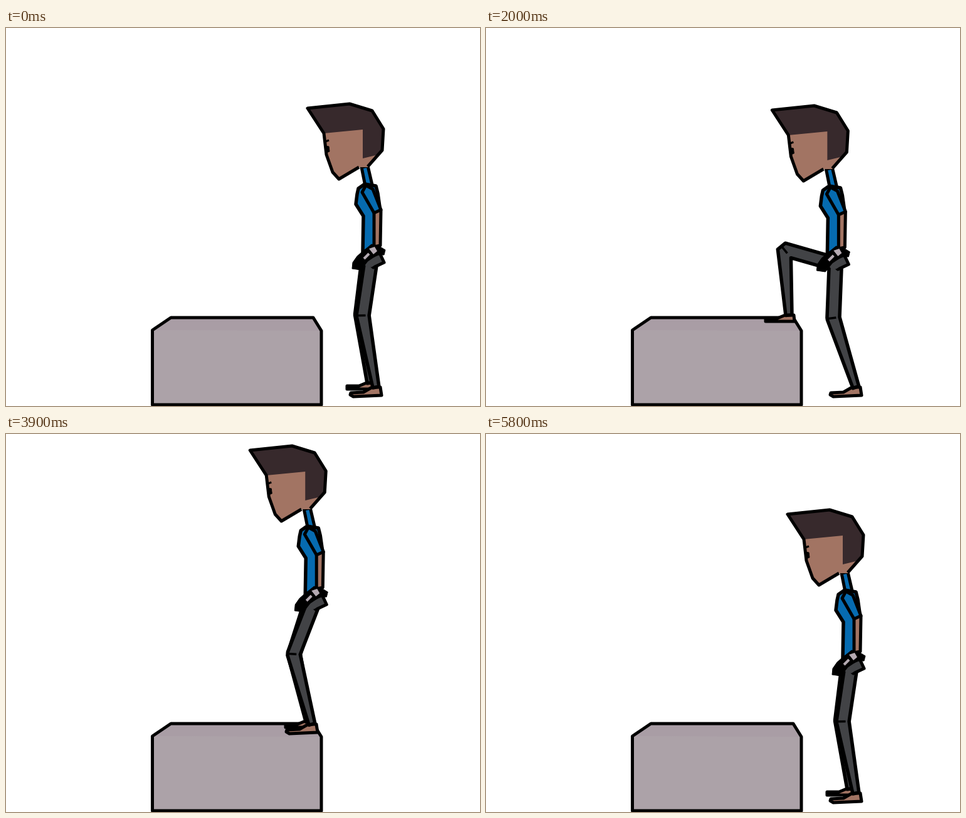
Animation of 756 by 603 pixels, one loop 5.9 s. Source, as an HTML page with a canvas:

```html
<!DOCTYPE html>
<html lang="en">
<head>
<meta charset="utf-8">
<title>Step-ups</title>
<style>
  html, body { margin: 0; width: 100%; height: 100%; overflow: hidden; background: #fff; }
  canvas { display: block; }
</style>
</head>
<body>
<canvas id="stage" width="756" height="603"></canvas>
<script>
const ctx = document.getElementById('stage').getContext('2d');
const LOOP = 5900, STEP = 100, REST = 200, REP = 2800;
const SKIN = '#a27463', HAIR = '#37292c', SHIRT = '#066bb0', PANTS = '#424346',
      BLOCK = '#aca2a8', SHADE = '#a99da5', GLOVE = '#b5aab2', INK = '#000';

// Ankle rests at "ground" or on the "block"
const NEAR = {
  hip: [582, 372], thigh: 88, calf: 116.5, ground: [590, 573], block: [488, 463],
  foot: [-6, 0, 7, 0, 9, 13, -36, 15, -41, 12, -40, 9, -20, 8]
};
const FAR = {
  hip: [577, 372], thigh: 86, calf: 110, ground: [581, 566], block: [483, 458],
  foot: [-6, 0, 8, 0, 9, 10, -37, 10, -37, 5, -18, 5]
};

const lerp = (a, b, k) => a + (b - a) * k;

function ease(t, from, to) {
  const u = Math.min(1, Math.max(0, (t - from) / (to - from)));
  return u * u * (3 - 2 * u);
}

// Shift of the upper body at time c of one repetition
function bodyAt(c) {
  return [
    95 * (ease(c, 1200, 2100) - ease(c, 100, 1000)) + 6 * (ease(c, 2200, 2600) - ease(c, 2680, 2800)),
    105 * ease(c, 1200, 1660) - 102 * ease(c, 470, 870) - 3 * ease(c, 1800, 2200)
  ];
}

// The leading foot goes up and comes down before the trailing one
function ankleAt(leg, c, leads) {
  const p = leads ? ease(c, 0, 580) - ease(c, 1230, 1720)
                  : ease(c, 450, 900) - ease(c, 1850, 2350);
  return [
    lerp(leg.ground[0], leg.block[0], p),
    lerp(leg.ground[1], leg.block[1], p) - 45 * Math.sin(Math.PI * p * p),
    -.5 * Math.sin(Math.PI * (1 - p) ** 2)
  ];
}

function trace(p, closed) {
  ctx.beginPath();
  for (let i = 0; i < p.length; i += 2) ctx.lineTo(p[i], p[i + 1]);
  if (closed) ctx.closePath();
}

function line(p, width = 5, color = INK, closed = false) {
  trace(p, closed);
  ctx.lineWidth = width;
  ctx.strokeStyle = color;
  ctx.stroke();
}

function shape(p, fill, width = 5) {
  trace(p, true);
  ctx.fillStyle = fill;
  ctx.fill();
  if (width) line(p, width, INK, true);
}

// Two-bone leg whose knee always points left
function drawLeg(leg, body, [ax, ay, pitch]) {
  const hx = leg.hip[0] + body[0], hy = leg.hip[1] + body[1];
  const d = Math.min(Math.hypot(ax - hx, ay - hy), leg.thigh + leg.calf - .1);
  const dir = Math.atan2(ay - hy, ax - hx);
  const bend = Math.acos((leg.thigh ** 2 + d * d - leg.calf ** 2) / (2 * leg.thigh * d));
  const along = leg.thigh * Math.cos(bend), out = leg.thigh * Math.sin(bend) * .93;
  const kx = hx + along * Math.cos(dir) - out * Math.sin(dir);
  const ky = hy + along * Math.sin(dir) + out * Math.cos(dir);
  const a1 = Math.atan2(ky - hy, kx - hx), a2 = Math.atan2(ay - ky, ax - kx);
  const mid = (a1 + a2) / 2;
  const side = (x, y, a, w) => [x - Math.sin(a) * w, y + Math.cos(a) * w];
  const back = side(kx, ky, mid, -10.5 / Math.cos((a1 - a2) / 2));

  ctx.save();
  ctx.translate(ax, ay);
  ctx.rotate(pitch);
  shape(leg.foot, SKIN);
  ctx.restore();

  shape([
    ...side(hx, hy, a1, 10), ...side(kx, ky, a1, 9.5), ...side(kx, ky, a2, 9.5),
    ...side(ax, ay, a2, 5), ...side(ax, ay, a2, -5), ...back, ...side(hx, hy, a1, -10)
  ], PANTS, 5.5);
  if (a1 - a2 < .8) line([...side(kx, ky, mid, 9), ...side(kx, ky, mid, -5)], 3.5);
}

function drawBlock() {
  const top = [233.5, 482, 263, 462, 490, 462, 503, 483];
  const edge = [...top, 503, 601, 233.5, 601];
  shape(edge, BLOCK, 0);
  shape(top, SHADE, 0);
  line(edge, 5, INK, true);
}

function drawTorso() {
  shape([567, 222, 577, 220, 584, 250, 573, 252], SHIRT);
  shape([562, 256, 572, 249, 590, 252, 593, 264, 597, 292, 594, 346,
         569, 358, 570, 300, 558, 281, 560, 265], SHIRT, 5.5);
}

function drawPelvis() {
  shape([571, 370, 596, 359, 603, 374, 586, 382], PANTS);
  ctx.beginPath();
  ctx.arc(580, 373, 9, 0, 2 * Math.PI);
  ctx.fillStyle = PANTS;
  ctx.fill();
}

function drawArm() {
  shape([587, 293, 598, 290, 597, 347, 587, 349], SKIN);
  shape([568, 262, 574, 251, 585, 257, 598, 290, 587, 295], SHIRT);
  shape([568, 357, 583, 345, 595, 348, 605, 354, 603, 362, 592, 362, 577, 372,
         566, 386, 552, 384, 553, 374, 560, 364], INK, 1);
  shape([579, 352, 588, 349, 592, 356, 586, 361], GLOVE, 0);
  line([571, 368, 579, 360], 4, GLOVE);
}

function drawHead() {
  const skull = [507, 168, 481, 128, 548, 121, 584, 132, 602, 161, 600, 195];
  const face = [563, 222, 531, 241, 521, 230, 511, 202, 507, 168];
  shape([...skull, 577, 222, ...face], SKIN, 0);
  shape([...skull, 594, 202, 569, 208, 569, 162], HAIR, 0);
  line([...face, ...skull, 577, 221]); // open where the neck joins
  line([510, 181, 515, 179], 3);
  shape([509, 188, 515, 189, 516, 197, 511, 199], INK, 1);
}

function draw(t) {
  const run = Math.max(0, t - REST), c = run % REP;
  const nearLeads = Math.floor(run / REP) % 2 === 0;
  const body = bodyAt(c);
  const withBody = (...parts) => {
    ctx.save();
    ctx.translate(body[0], body[1]);
    parts.forEach(part => part());
    ctx.restore();
  };
  ctx.fillStyle = '#fff';
  ctx.fillRect(0, 0, 756, 603);
  ctx.lineJoin = 'round';
  drawBlock();
  drawLeg(FAR, body, ankleAt(FAR, c, !nearLeads));
  withBody(drawTorso);
  drawLeg(NEAR, body, ankleAt(NEAR, c, nearLeads));
  withBody(drawPelvis, drawArm, drawHead);
}

const start = performance.now();
function tick() {
  draw(Math.floor((performance.now() - start) % LOOP / STEP) * STEP);
  requestAnimationFrame(tick);
}
tick();
</script>
</body>
</html>
```
